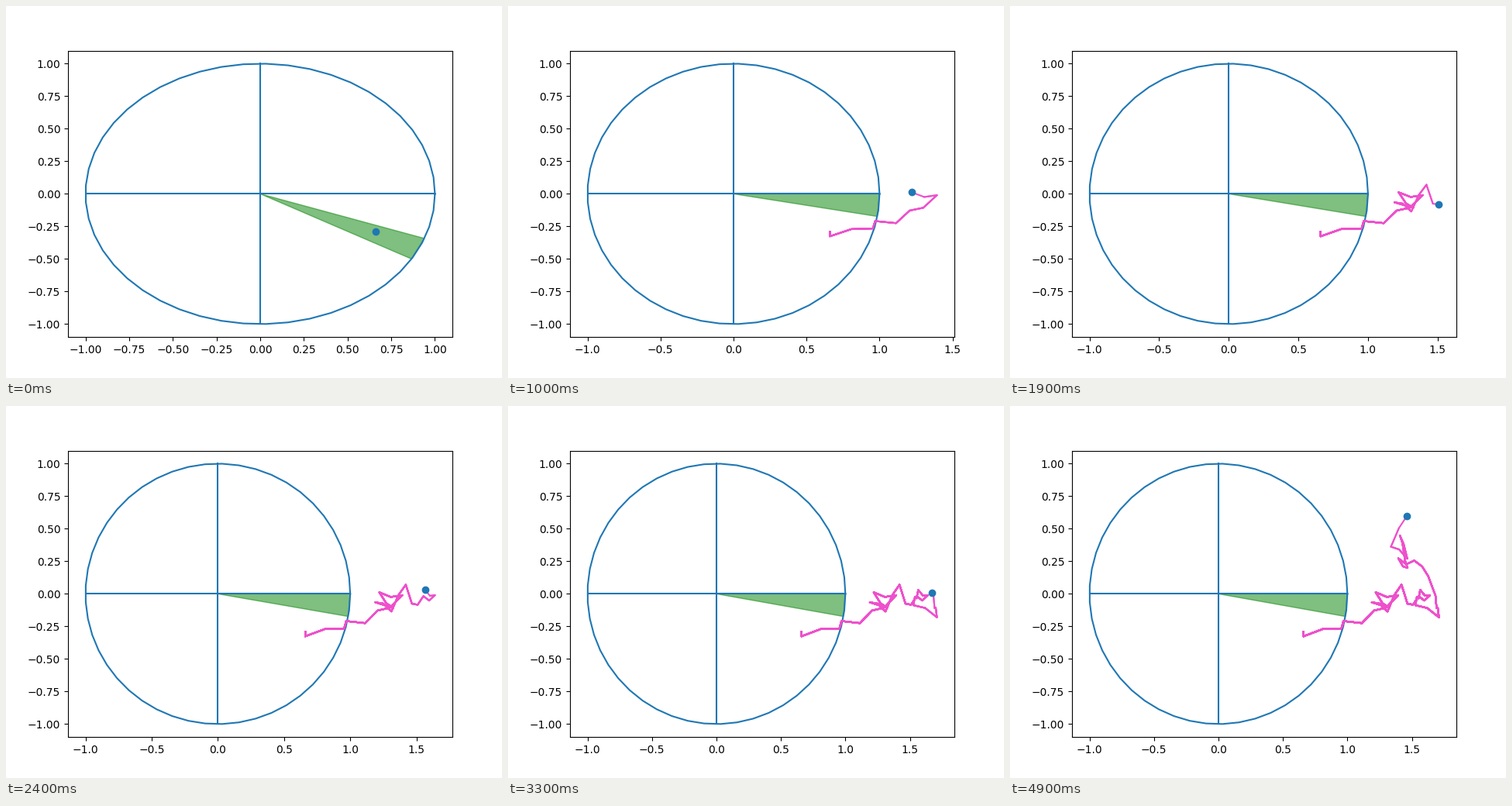
A matplotlib script for the animation above (5500 ms loop, 640x480 px).

```python
import math

import matplotlib.pyplot as plt
import numpy as np
from matplotlib.animation import FuncAnimation

STEP_MS = 100
STEPS = 55            # the walk ends early and its last pose is held
BLUE, GREEN, PINK = "#1f77b4", "g", "#ee50cc"
ZIGZAG = 0.025        # sideways sway of the steps between two turns

# Main turns of the walk: step, x, y.
TURNS = np.array([
    (0, 0.66, -0.29), (1, 0.66, -0.326), (3, 0.954, -0.266),
    (4, 0.97, -0.209), (5, 1.113, -0.225), (8, 1.393, -0.01),
    (10, 1.22, 0.012), (12, 1.325, -0.107), (13, 1.19, -0.065),
    (15, 1.311, -0.135), (17, 1.42, 0.07), (18, 1.466, -0.075),
    (22, 1.64, -0.01), (24, 1.565, 0.03), (27, 1.527, -0.087),
    (29, 1.71, -0.18), (33, 1.674, 0.011), (35, 1.58, 0.21),
    (38, 1.395, 0.273), (40, 1.467, 0.199), (43, 1.407, 0.449),
    (45, 1.465, 0.27), (47, 1.338, 0.362), (49, 1.461, 0.597),
])


def build_walk():
    """Join the turns step by step, swaying up and down in between."""
    turn_steps, turn_x, turn_y = TURNS.T
    steps = np.arange(turn_steps[-1] + 1)
    sway = np.where(steps % 2 == 0, ZIGZAG, -ZIGZAG)
    sway[np.isin(steps, turn_steps)] = 0
    return np.column_stack([np.interp(steps, turn_steps, turn_x),
                            np.interp(steps, turn_steps, turn_y) + sway])


def sector_start(x, y):
    """Lower angle of the walker's 10 degree sector; the last one outside."""
    if math.hypot(x, y) >= 1:
        return -10
    return 10 * math.floor(math.degrees(math.atan2(y, x)) / 10)


def draw_sector(start):
    a, b = np.radians([start, start + 10])
    ax.fill([0, np.cos(a), np.cos(b)], [0, np.sin(a), np.sin(b)],
            color=GREEN, alpha=0.5)


def draw(step):
    last = min(step, len(walk) - 1)
    x, y = walk[last]
    ax.cla()
    draw_sector(sector_start(x, y))
    ax.plot(np.cos(theta), np.sin(theta), color=BLUE)
    ax.plot([-1, 1], [0, 0], color=BLUE)
    ax.plot([0, 0], [-1, 1], color=BLUE)
    # The trail is laid down again at every step, so older parts look heavier.
    for end in range(1, last + 1):
        ax.plot(*walk[:end + 1].T, color=PINK)
    ax.plot(x, y, "o", color=BLUE)


walk = build_walk()
theta = np.linspace(0, 2 * np.pi, 50)
fig, ax = plt.subplots(figsize=(6.4, 4.8), dpi=100)
anim = FuncAnimation(fig, draw, frames=STEPS, interval=STEP_MS,
                     init_func=lambda: None, repeat=True, repeat_delay=0)
plt.show()
```
